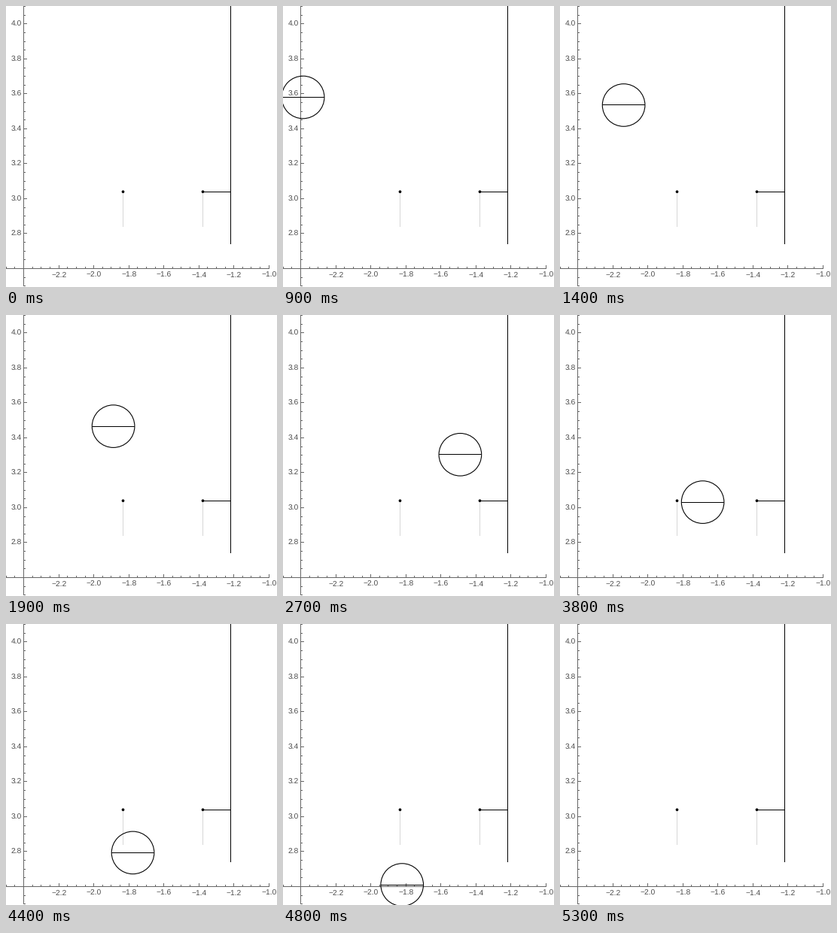
These frames come from a looping animation (360x374 px, 8000 ms). A matplotlib script:

```python
import math

import matplotlib.pyplot as plt
from matplotlib.animation import FuncAnimation
from matplotlib.patches import Circle

W, H, DPI = 360, 374, 100
PX = 72 / DPI                      # one pixel in points
SCALE = 232.6                      # pixels per metre
GREY, NET = "0.4", "0.84"
RADIUS = 28.3
GRAVITY = 0.228                    # pixels per step squared
FIRST, LAST = 5, 52                # steps in which the ball is in view

# Free flights between bounces: start step, x, y, vx, vy
FLIGHTS = [
    (9, 26.6, 121.5, 11.6, 1.52),
    (30, 270.2, 203.7, -8.3, 6.31),      # off the board
    (32, 253.2, 215.6, -10.6, 4.9),      # off the front of the rim
    (38.7, 182.2, 253.5, -2.58, 9.0),    # off the far side of the rim
]

plt.rcParams["font.family"] = "Liberation Sans"
plt.rcParams["text.hinting"] = "none"
fig = plt.figure(figsize=(W / DPI, H / DPI), dpi=DPI, facecolor="white")
ax = fig.add_axes([0, 0, 1, 1])
ax.set(xlim=(0, W), ylim=(H, 0))
ax.axis("off")


def crisp(v):
    """Centre of the pixel that holds v."""
    return math.floor(v) + 0.5


def to_x(x):
    return crisp(23.6 + (x + 2.4) * SCALE)


def to_y(y):
    return crisp(349.5 - (y - 2.6) * SCALE)


def line(x0, y0, x1, y1, color="black", z=2):
    return ax.plot([x0, x1], [y0, y1], color=color, lw=PX, snap=False,
                   solid_capstyle="butt", zorder=z)[0]


def label(x, y, value, ha):
    text = f"{value:.1f}".replace("-", "\u2212")
    ax.text(x, y, text, size=10.2 * PX, color="0.3", ha=ha,
            va="center_baseline")


def draw_axes():
    line(23.5, 0, 23.5, 373, GREY)
    line(0, 349.5, 350, 349.5, GREY)
    for k in range(-2, 29):
        value = -2.4 + 0.05 * k
        x, major = to_x(value), k % 4 == 0
        line(x, 349.5, x, 345 if major else 347, GREY)
        if major and k:
            label(x, 357.6, value, "center")
    for k in range(-2, 31):
        value = 2.6 + 0.05 * k
        y, major = to_y(value), k % 4 == 0
        line(23.5, y, 28 if major else 26, y, GREY)
        if major and k:
            label(20.6, y - 0.3, value, "right")


def draw_hoop():
    for x in (155.5, 261.5):
        line(x, 247, x, 294, NET, z=1)
        ax.add_patch(Circle((x, 247.2), 1.85, color="black", lw=0, zorder=4))
    line(261.5, 247.5, 298.5, 247.5)
    line(298.5, 0, 298.5, 317)


def ball_at(step):
    flight = FLIGHTS[0]
    for f in FLIGHTS[1:]:
        if step >= f[0]:
            flight = f
    start, x, y, vx, vy = flight
    t = step - start
    return x + vx * t, y + vy * t + GRAVITY * t * t / 2


draw_axes()
draw_hoop()
ball = ax.add_patch(Circle((0, 0), RADIUS, fill=False, ec="black",
                           lw=1.1 * PX, zorder=3))
seam = line(0, 0, 0, 0, z=3)


def update(step):
    x, y = ball_at(step)
    ball.center = x, y
    seam.set_data([x - RADIUS, x + RADIUS], [crisp(y)] * 2)
    for part in (ball, seam):
        part.set_visible(FIRST <= step <= LAST)
    return ball, seam


anim = FuncAnimation(fig, update, frames=80, interval=100, repeat=True,
                     repeat_delay=0, blit=False)
plt.show()
```
